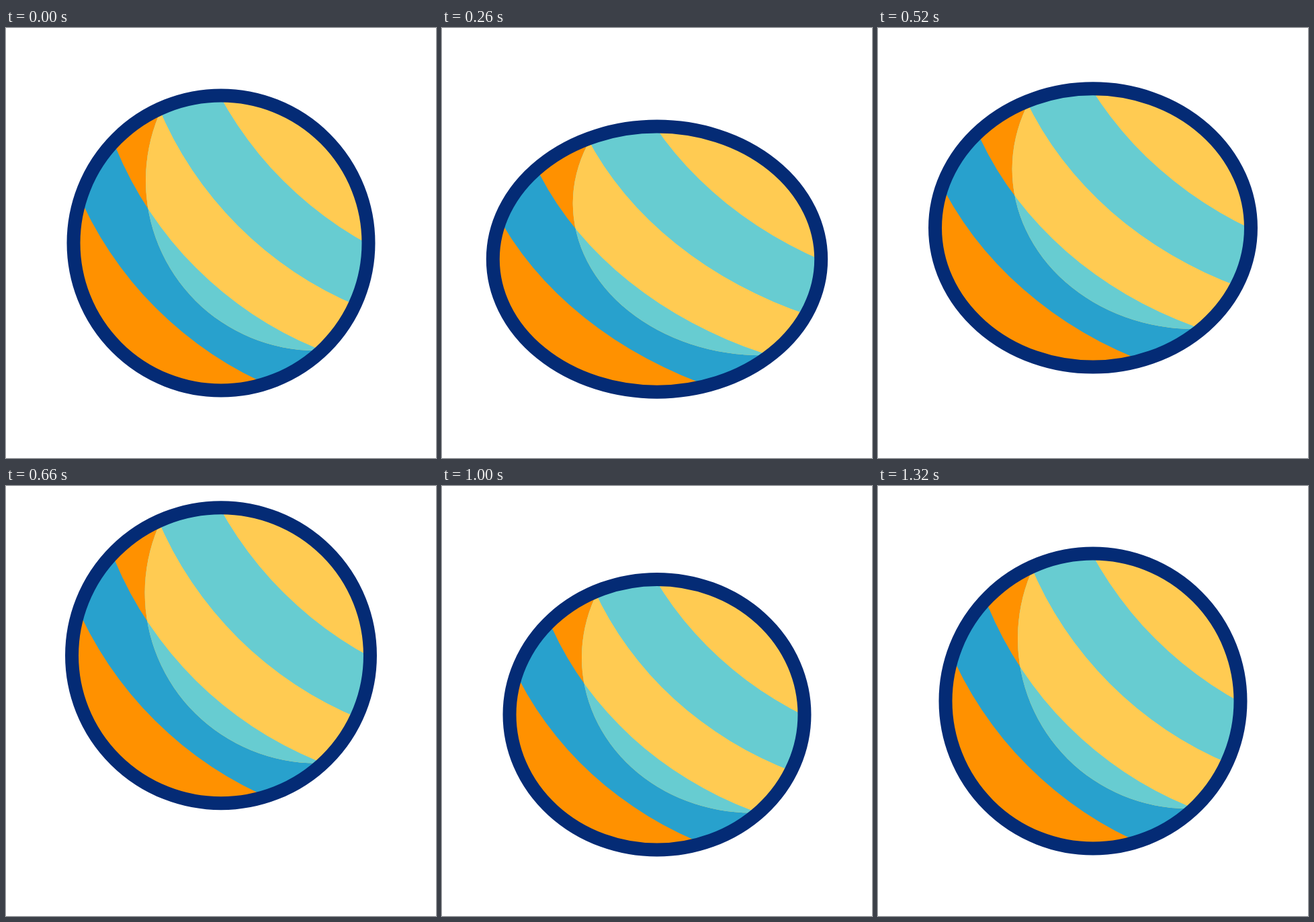
These frames come from a looping animation (640 px wide and 640 px high, 1.6 s). An HTML page with a canvas:

```html
<!DOCTYPE html>
<html lang="en">
<head>
<meta charset="utf-8">
<title>Bouncing ball</title>
<style>
  html, body { margin: 0; width: 100%; height: 100%; overflow: hidden; background: #fff; }
  canvas { display: block; width: 640px; height: 640px; }
</style>
</head>
<body>
<canvas width="640" height="640"></canvas>
<script>
const ctx = document.querySelector('canvas').getContext('2d');
const LOOP = 1600, STEP = 20, LINE = 20, INNER = 209.5;
const NAVY = '#042b75';
const DARK = ['#ff9100', '#28a1cd'];
const LIGHT = ['#ffcb52', '#67ccd1'];

// Keyframes as [time, value], eased in and out between neighbours.
const centerY = [[0, 320], [333, 347.5], [705, 248.2], [1005, 340.3], [1320, 320]];
const radiusX = [[0, 229.5], [333, 257.7], [733, 229.5]];
const radiusY = [[0, 229.5], [333, 204.5], [733, 232.5], [940, 232.5], [1003, 211.2], [1320, 229.5]];

// Stripe edges: equal arcs at these offsets along the up-right diagonal.
const EDGES = [-137, -52.5, 36, 131], EDGE_RADIUS = 550;

function valueAt(keys, t) {
  const i = keys.findIndex(([time]) => time > t);
  if (i < 0) return keys[keys.length - 1][1];
  const [t0, a] = keys[i - 1], [t1, b] = keys[i];
  const u = (t - t0) / (t1 - t0);
  return a + (b - a) * u * u * (3 - 2 * u);
}

function ellipsePath(x, y, rx, ry = rx) {
  ctx.beginPath();
  ctx.ellipse(x, y, rx, ry, 0, 0, 2 * Math.PI);
}

function stripes(colors) {
  ctx.fillStyle = colors[0];
  ctx.fillRect(-300, -300, 600, 600);
  EDGES.forEach((edge, i) => {
    const d = (edge + EDGE_RADIUS) * Math.SQRT1_2;
    ellipsePath(d, -d, EDGE_RADIUS);
    ctx.fillStyle = colors[(i + 1) % 2];
    ctx.fill();
  });
}

function draw(t) {
  const rx = valueAt(radiusX, t), ry = valueAt(radiusY, t);
  const outline = () => ellipsePath(0, 0, rx - LINE / 2, ry - LINE / 2);

  ctx.fillStyle = '#fff';
  ctx.fillRect(0, 0, 640, 640);
  ctx.save();
  ctx.translate(320, valueAt(centerY, t));

  ctx.save();
  outline();
  ctx.clip();
  ctx.scale((rx - LINE) / INNER, (ry - LINE) / INNER);
  stripes(DARK);
  ellipsePath(141, -93, 253);
  ctx.clip();
  stripes(LIGHT);
  ctx.restore();

  outline();
  ctx.lineWidth = LINE;
  ctx.strokeStyle = NAVY;
  ctx.stroke();
  ctx.restore();
}

function tick() {
  const t = performance.now() % LOOP;
  draw(Math.floor(t / STEP) * STEP);
  requestAnimationFrame(tick);
}
tick();
</script>
</body>
</html>
```
